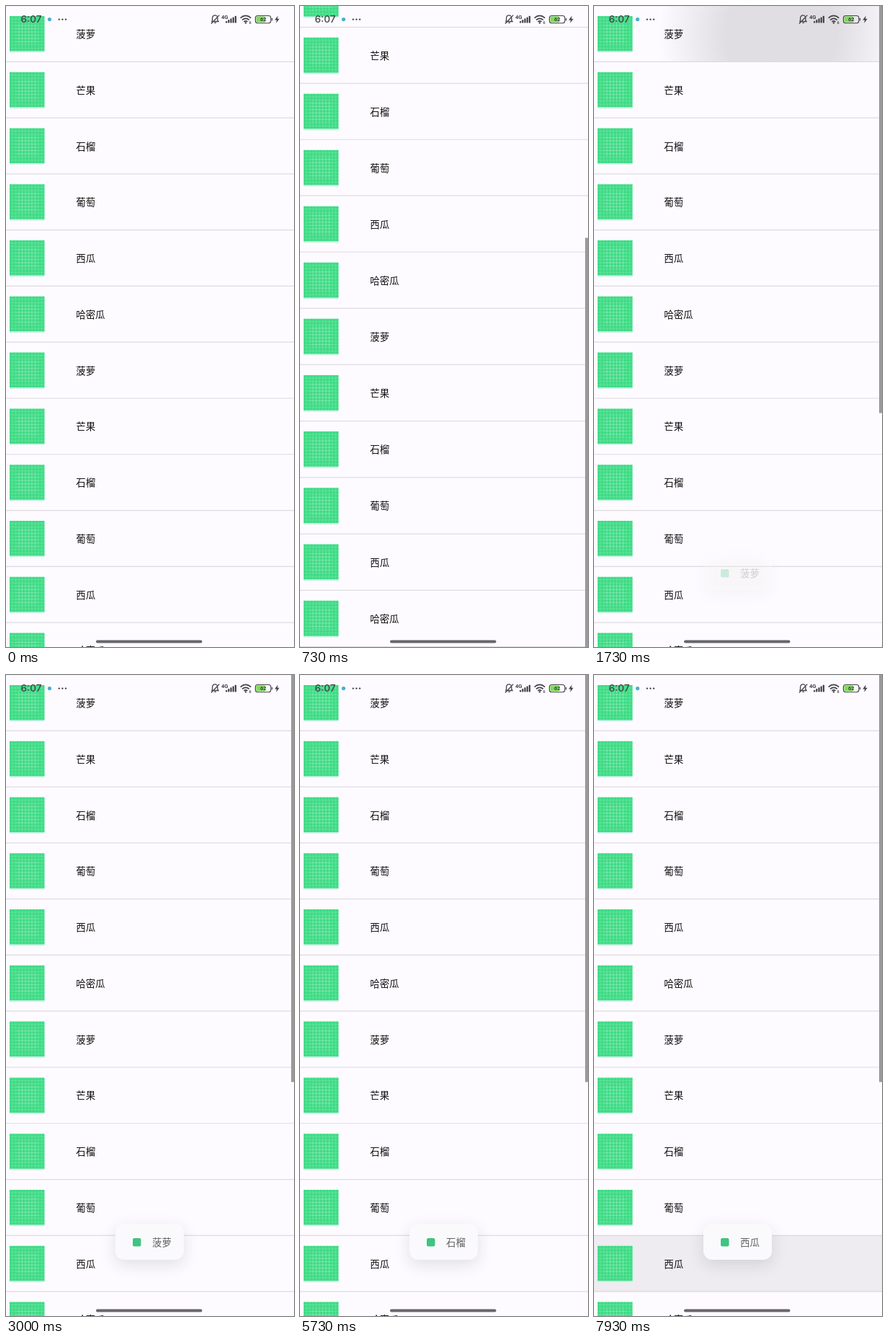
An HTML page with a canvas for the animation above (8 s loop, 400x889 px).

```html
<!DOCTYPE html>
<html lang="zh-CN">
<head>
<meta charset="utf-8">
<title>水果列表</title>
<style>
html, body { margin: 0; width: 100%; height: 100%; overflow: hidden; background: #fdfbff; }
canvas { display: block; width: 400px; height: 889px; }
</style>
</head>
<body>
<canvas id="stage"></canvas>
<script>
const W = 400, H = 889, LOOP = 8000;
const ROW = 77.77, COUNT = 18, MAX = ROW * COUNT - H;
const FRUITS = ['菠萝', '芒果', '石榴', '葡萄', '西瓜', '哈密瓜'];
const CJK = '"Noto Sans CJK SC", "Noto Sans SC", "Noto Sans CJK", sans-serif';
const INK = '#434145';
// touch time, toast time, row, touch x
const TAPS = [[1680, 1690, 0, 260], [4450, 4540, 2, 220], [7390, 7480, 10, 230]];

const canvas = document.getElementById('stage');
const g = canvas.getContext('2d');
const dpr = window.devicePixelRatio || 1;
canvas.width = W * dpr;
canvas.height = H * dpr;

const ramp = (t, a, b) => Math.min(1, Math.max(0, (t - a) / (b - a)));

function scrollAt(t) {
  return MAX * (ramp(t, 370, 690) ** 1.5 - ramp(t, 790, 1020) ** 1.5);
}

// Overscroll stretch: maps a list position to its place on screen.
function stretchAt(t) {
  const top = 25.5 * ramp(t, 1010, 1065) * (1 - ramp(t, 1065, 1540)) ** 3 ;
  const bottom = 3.7 * ramp(t, 690, 730) * (1 - ramp(t, 740, 800));
  return y => {
    const u = Math.min(1, Math.max(0, y / H));
    return y + top * (1.12 - (1 - u) ** 1.7) - bottom * (1 - u ** 1.7);
  };
}

function text(s, x, y, font, color) {
  g.font = font;
  g.fillStyle = color;
  g.fillText(s, x, y);
}

function rect(x, y, w, h, color, r = 0) {
  g.fillStyle = color;
  g.beginPath();
  g.roundRect(x, y, w, h, r);
  g.fill();
}

function dot(x, y, r, color) {
  g.fillStyle = color;
  g.beginPath();
  g.arc(x, y, r, 0, 7);
  g.fill();
}

function path(d, width, color = INK) {
  g.strokeStyle = color;
  g.lineWidth = width;
  g.stroke(new Path2D(d));
}

function tile(x, y, size) {
  rect(x, y + size, size, 1.8, '#c8f1e6');
  rect(x, y, size, size, '#3edb85');
  const k = size / 108;
  let d = '';
  for (let i = 9; i < 108; i += 10) {
    const p = i * k;
    d += `M${x + p} ${y}v${size}M${x} ${y + p}h${size}`;
    if (i > 20 && i < 80) {
      d += `M${x + p} ${y + 19 * k}v${70 * k}M${x + 19 * k} ${y + p}h${70 * k}`;
    }
  }
  path(d, 0.45, 'rgba(255,255,255,.35)');
}

function ripple(t, [touch, toast, , x]) {
  const a = 0.13 * ramp(t, touch, touch + 50) * (1 - ramp(t, toast + 60, toast + 840));
  if (!a) return;
  const r = 100 + 1.4 * (t - touch);
  const fill = g.createRadialGradient(x, ROW / 2, r * 0.45, x, ROW / 2, r);
  fill.addColorStop(0, `rgba(30,26,32,${a})`);
  fill.addColorStop(1, 'rgba(30,26,32,0)');
  g.fillStyle = fill;
  g.fillRect(0, 0, W, ROW);
}

function list(t) {
  const scroll = scrollAt(t), map = stretchAt(t);
  for (let i = 0; i < COUNT; i++) {
    const top = map(i * ROW - scroll), end = map((i + 1) * ROW - scroll);
    if (end < -5 || top > H + 5) continue;
    g.save();
    g.translate(0, top);
    g.scale(1, (end - top) / ROW);
    for (const tap of TAPS) if (tap[2] === i) ripple(t, tap);
    tile(5, 14, 48.5);
    text(FRUITS[i % 6], 97.3, 44, '13.4px ' + CJK, '#111');
    if (!i) rect(0, -1, W, 1.2, '#dedce0');
    rect(0, ROW - 1, W, 1.2, '#dedce0');
    g.restore();
  }
  const shown = ramp(t, 380, 400) * (1 - ramp(t, 3170, 3470))
    + ramp(t, 4450, 4470) * (1 - ramp(t, 6170, 6470)) + ramp(t, 7390, 7410);
  const bar = H / (ROW * COUNT);
  const y = map(scroll * bar), end = map((scroll + H) * bar);
  g.globalAlpha = shown;
  rect(396, y, 4, end - y, '#9b999c');
  g.globalAlpha = 1;
}

function toast(t, [, start, row]) {
  const a = ramp(t, start, start + 160) * (1 - ramp(t, start + 2360, start + 2620));
  if (!a) return;
  g.save();
  g.globalAlpha = a;
  g.shadowColor = 'rgba(40,36,44,.13)';
  g.shadowBlur = 22 * dpr;
  g.shadowOffsetY = 7 * dpr;
  rect(152, 761, 95, 50, '#faf9fb', 12);
  g.shadowColor = 'transparent';
  rect(174, 779, 15, 16, '#fff', 3);
  rect(176, 781, 11.5, 11.5, '#40c480', 2);
  text(FRUITS[row % 6], 203, 792, '13.4px ' + CJK, '#626064');
  g.restore();
}

function statusBar() {
  text('6:07', 20.5, 23.2, '500 13.6px Inter, Roboto, sans-serif', INK);
  dot(60.5, 18.6, 2.6, '#4aaed0');
  for (const x of [73.8, 78.4, 83]) dot(x, 18.6, 1.2, INK);

  // muted bell
  path('M286 21.5h9l-1.2-2v-3a3.6 3.6 0 0 0-7.2 0v3zM289.4 23.4h2.4M285 24.5L296.3 12.6', 1.3);

  text('4G', 299, 18, 'bold 7.6px Roboto, sans-serif', INK);
  for (let i = 0; i < 5; i++) {
    const h = 2.5 + i * 1.8;
    rect(305 + i * 3.2, 23.4 - h, 2.2, h, INK, 0.6);
  }

  // wifi
  path('M325.6 16.6q7.3-6.4 14.6 0M328 19.4q4.9-4.2 9.8 0M330.4 21.9q2.5-2 5 0', 1.7);
  dot(332.9, 23.4, 1.2, INK);
  text('6', 337.6, 25.2, '500 5.5px Roboto, sans-serif', INK);

  // battery
  rect(347.5, 14.6, 12.8, 8, '#7ddc5a', 1.6);
  g.strokeStyle = INK;
  g.lineWidth = 1.1;
  g.beginPath();
  g.roundRect(346.4, 13.5, 21.4, 10.2, 3);
  g.stroke();
  rect(368.8, 16.8, 1.3, 3.6, INK, 0.6);
  text('62', 353, 21.4, 'bold 7.4px Roboto, sans-serif', INK);
  g.fill(new Path2D('M377.6 13.6L373.2 19.4h2.8l-.8 4.4 4.5-6h-2.8z'));
}

function draw(now) {
  const t = now % LOOP;
  g.setTransform(dpr, 0, 0, dpr, 0, 0);
  rect(0, 0, W, H, '#fdfbff');
  list(t);
  for (const tap of TAPS) toast(t, tap);
  statusBar();
  rect(125, 879.6, 147.5, 3.8, '#69666b', 2);
}

const start = performance.now();
function frame() {
  draw(performance.now() - start);
  requestAnimationFrame(frame);
}
frame();
</script>
</body>
</html>
```
